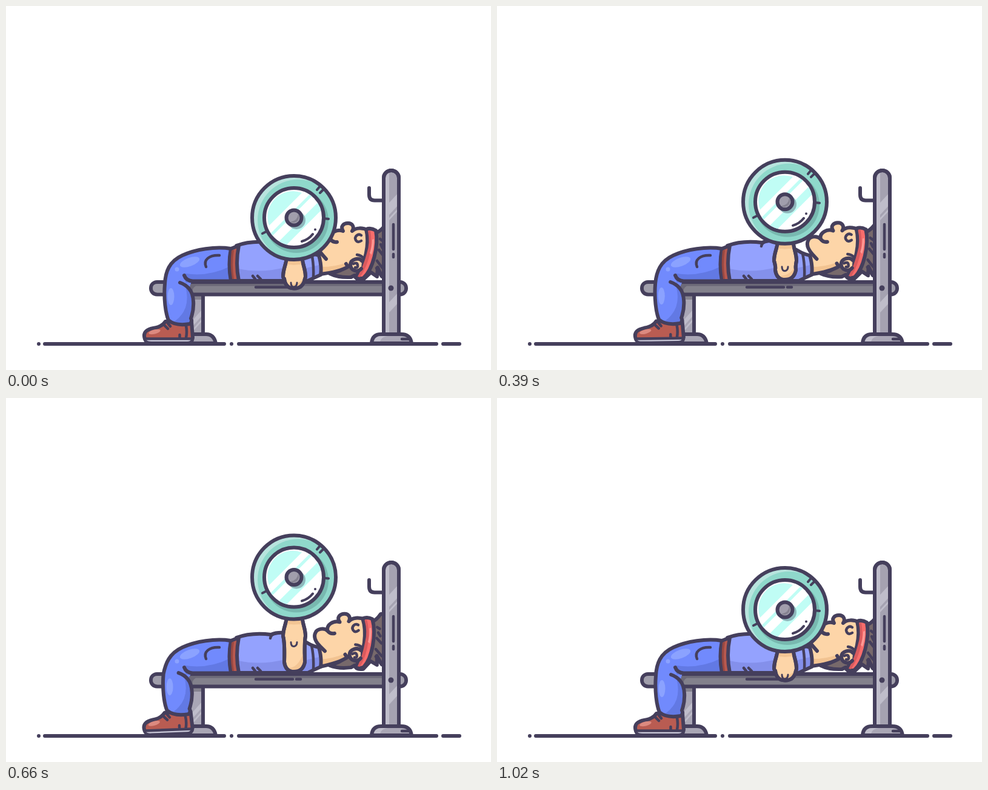
An HTML page for the animation above (1.26 s loop, 800 px wide and 600 px high).

```html
<!DOCTYPE html>
<html lang="en">
<head>
<meta charset="utf-8">
<title>Bench press</title>
<style>
  html, body { margin: 0; width: 100%; height: 100%; overflow: hidden; background: #fff; }
  svg { display: block; width: 800px; height: 600px; }
  .o { stroke: #453f5c; stroke-width: 6; stroke-linecap: round; stroke-linejoin: round; }
  .l { fill: none; stroke: #453f5c; stroke-width: 4.5; stroke-linecap: round; stroke-linejoin: round; }
  .n { fill: none; }
</style>
</head>
<body>
<svg viewBox="0 0 800 600">
  <defs>
    <clipPath id="postClip"><path d="M623 541V283.500a12.500 12.500 0 0 1 25 0V541z"/></clipPath>
    <clipPath id="glassClip"><circle r="46"/></clipPath>
    <clipPath id="rimClip"><circle r="69"/></clipPath>
    <clipPath id="legClip"><path id="legShape"/></clipPath>
    <clipPath id="armClip"><path id="armShape"/></clipPath>
  </defs>

  <!-- floor -->
  <path class="o n" d="M54 557h0M64 557H360M372 557h0M384 557H710M721 557H748"/>

  <!-- bench -->
  <g>
    <path class="o" fill="#a9a6b5" d="M303 472H325V543H303z"/>
    <path fill="#bfbdca" d="M306 520L322 502V512L306 530zM306 535L322 517V521L306 539z"/>
    <path fill="#85828f" d="M306 478H322V484H306z"/>
    <path class="o" fill="#a9a6b5" d="M290 541H330Q343 541 346 556H290z"/>
    <rect class="o" x="239" y="455" width="421" height="20.500" rx="10" fill="#83818c"/>
    <path fill="#a09eab" d="M250 458Q242 458 242 465T250 472.500H262V458zM650 458H650Q657 459 657 465T650 472.500z"/>
    <path fill="#6c6978" d="M300 458H622V461.500H313Q306 466 308 472H302z"/>
    <path class="l" stroke-width="4" d="M412 463.500H473M479 463.500H486"/>
  </g>

  <!-- head -->
  <g id="head">
    <path class="o" fill="#77696b" d="M608 375Q617 372 624 363L636 362V446L620 446L613 431L612 446L602 439L589 451Q577 452 575 444L569 447Q548 448 534 441Q552 438 562 429L590 400z"/>
    <path class="l" stroke-width="4" d="M621 387L617 384M622 411L615 402M621 432L612 420M618 444L611 432M621 399L618 393"/>
    <path fill="#fdd5a8" d="M510 411L521 408C516 402 512 393 514 387C517 379 529 378 535 384C534 374 545 367 556 371C551 363 557 358 564 358C572 358 575 365 571 371C577 365 590 365 598 370C601 392 594 420 585 433L564 431Q548 438 518 443z"/>
    <path fill="#f2c391" d="M515 430Q540 431 562 423L564 431Q546 438 518 443z"/>
    <path class="o n" d="M528 417L521 409C515 402 511 394 514 387C517 379 529 378 535 384C533 374 546 367 556 371C551 363 557 358 564 358C572 358 575 365 571 371C577 365 588 365 598 370"/>
    <path class="o n" stroke-width="5" d="M535 384Q539 390 546 389"/>
    <path class="o n" d="M519 442Q550 438 564 430L561 425"/>
    <path class="l" d="M586 378C580 374 574 381 577 386Q580 391 586 387"/>
    <path class="o" fill="#f96d6c" d="M594 368Q602 365 610 370C615 396 605 434 590 448Q582 451 577 446C593 426 600 391 594 368z"/>
    <path fill="#d95b5e" d="M597 371Q601 390 595 408Q589 430 580 446L584 447Q596 430 601 405Q604 388 601 370z"/>
    <path fill="#ff9a96" d="M604 385L607 384Q607 398 603 410L600 407Q604 396 604 385z"/>
    <path class="l" stroke-width="5" d="M579 410Q586 411 590 416"/>
    <path class="o" stroke-width="5" fill="#fdd5a8" d="M587 420C582 414 569 417 568 426C568 436 580 440 586 433"/>
    <path class="l" stroke-width="4" d="M573 425Q579 422 580 427T576 431"/>
  </g>

  <!-- torso -->
  <g>
    <path class="o" fill="#94a2fe" d="M380 395Q405 386 437 390Q446 386 460 387L494 402Q505 409 516 411Q521 428 519 443L497 453H380z"/>
    <path fill="#8490eb" d="M383 433Q420 441 460 431L495 432L516 427L516 441L497 450H383z"/>
    <path class="l" stroke-width="5" d="M436 396Q437 389 446 388M504 408Q508 426 507 446M407 445L411 450M415 445L420 450"/>
  </g>

  <!-- shoe -->
  <g id="shoe">
    <path class="o" fill="#b95c52" d="M229 549C225 537 233 533 243 531Q257 529 263 520H306L308 547Q307 555 300 555H240Q231 555 229 549z"/>
    <path fill="#cbcada" d="M231 550H305Q304 553 299 553H240Q233 553 231 550z"/>
    <ellipse cx="245" cy="537" rx="10" ry="3.500" fill="#dc8a80" transform="rotate(-14 245 537)"/>
    <path class="l" stroke-width="4" d="M230 548.500H306M297 527Q299 537 297 547M286.500 542V546M262 527L267 532M267 523L271 528"/>
  </g>

  <!-- trousers -->
  <g>
    <path id="legFill" fill="#718afd"/>
    <g clip-path="url(#legClip)">
      <path fill="#6279e4" d="M296 441Q335 447 372 428V456H296z"/>
      <path id="calfShade" fill="#6279e4" d="M296 462Q306 500 278 520L290 530H315V462z"/>
      <ellipse cx="303" cy="422" rx="17" ry="7" fill="#8ba2ff" transform="rotate(-20 303 422)"/>
      <circle cx="282" cy="434" r="3.500" fill="#8ba2ff"/>
      <ellipse id="calfShine" cx="272" cy="479" rx="5.500" ry="14" fill="#8ba2ff"/>
    </g>
    <path id="legLine" class="o n"/>
    <path class="l" d="M330 430C325 418 336 410 352 411"/>
    <path class="o" fill="#b8594f" d="M371 400Q366 426 371 453H384Q378 424 384 395z"/>
    <path fill="#984842" d="M372 403Q369 427 373 450H376Q372 426 376 402z"/>
  </g>

  <!-- arm -->
  <g>
    <path id="arm" class="o" fill="#fdd5a8"/>
    <g clip-path="url(#armClip)"><path id="armShade" fill="#f3c594"/></g>
    <path id="armLine" class="o n"/>
    <path id="crease" class="l" style="stroke-width:3"/>
  </g>

  <!-- weight -->
  <g id="plate">
    <circle r="69" fill="#b8e4de"/>
    <g clip-path="url(#rimClip)">
      <circle cx="7" cy="4" r="67" fill="#8fd8cb"/>
      <circle cx="4" cy="5" r="53" fill="#78b9b0"/>
    </g>
    <circle class="o n" r="69"/>
    <circle class="o" r="49" fill="#fff"/>
    <g clip-path="url(#glassClip)" fill="#c0fdf5">
      <path d="M-41 13A42 42 0 0 1 13 -41z"/>
      <g transform="rotate(-45)">
        <rect x="-50" y="-9" width="100" height="5"/>
        <rect x="-50" y="10" width="100" height="13"/>
      </g>
    </g>
    <circle cx="4" cy="4" r="15" fill="#8eb7bb"/>
    <circle class="o" r="12.500" fill="#a19eac"/>
    <path fill="#858290" d="M7 -6A9.500 9.500 0 0 1 -6 7Q6 5 7 -6z"/>
    <path class="l" style="stroke-width:4" d="M38 -46L43 -52M43 -41L49 -47M52 1.500L57 2M-52 26L-46 23M13 39Q24 36 31 27M35 19.500h0"/>
  </g>

  <!-- rack -->
  <g>
    <path class="o n" d="M599 300V311Q599 320.500 608 320.500H622"/>
    <path class="o" fill="#a5a2b1" d="M623 541V283.500a12.500 12.500 0 0 1 25 0V541z"/>
    <g clip-path="url(#postClip)" fill="#bfbdca">
      <path d="M626 541V284Q627 276 632 275V541z"/>
      <path d="M623 334L648 307V327L623 354zM623 359L648 332V336L623 363zM623 498L648 471V488L623 515z"/>
    </g>
    <path class="o n" d="M623 541V283.500a12.500 12.500 0 0 1 25 0V541z"/>
    <path class="l" stroke-width="4" d="M639 360V401M639 409V414"/>
    <circle cx="635" cy="465" r="4.500" fill="#453f5c"/>
    <path class="o" fill="#a9a6b5" d="M603 556Q604 541 619 541H652Q667 541 669 556z"/>
    <path fill="#c1bfcc" d="M607 553Q609 544 619 544H630Q619 545 617 553z"/>
    <path class="l" stroke-width="4" d="M653 549H665"/>
  </g>
</svg>
<script>
  const LOOP = 1260, STEP = 30, LAST = 1020;
  const $ = id => document.getElementById(id);
  const set = (id, d) => $(id).setAttribute('d', d);
  const move = (id, t) => $(id).setAttribute('transform', t);

  // [time, value] pairs
  const barKeys = [[0, 349], [90, 355.5], [180, 353], [300, 337], [450, 313], [540, 298],
                   [600, 288.5], [660, 295.5], [780, 314], [1020, 349]];
  const headKeys = [[0, 0], [180, 0], [300, -.6], [450, -1.7], [540, -3.3], [600, -4.8],
                    [660, -4.2], [780, -1.7], [1020, 0]];
  const footKeys = [[0, 0], [330, 0], [450, .75], [600, 1.1], [660, .95], [770, 0], [1020, 0]];

  // smooth curve through the keys
  function at(keys, t) {
    let i = 0;
    while (i < keys.length - 2 && t > keys[i + 1][0]) i++;
    const slope = k => {
      const a = keys[Math.max(k - 1, 0)], b = keys[Math.min(k + 1, keys.length - 1)];
      return (b[1] - a[1]) / (b[0] - a[0]);
    };
    const [t0, v0] = keys[i], [t1, v1] = keys[i + 1];
    const d = t1 - t0, u = (t - t0) / d, w = 1 - u;
    return w * w * (1 + 2 * u) * v0 + u * u * (3 - 2 * u) * v1
         + d * u * w * (w * slope(i) - u * slope(i + 1));
  }

  function drawArm(y) {
    const e = y + 112, b = Math.max(451, e + 4.5);
    const d = `M464 ${y + 60}C463 ${e - 36} 457 ${e - 29} 457 ${e - 15}`
            + `Q460 ${e - 5} 459 ${b - 16}Q461 ${b} 475 ${b}Q490 ${b} 493 ${b - 16}`
            + `Q492 ${e - 5} 494 ${e - 15}C494 ${e - 29} 488 ${e - 36} 488 ${y + 60}`;
    for (const id of ['arm', 'armShape', 'armLine']) set(id, d);
    set('armShade', `M455 ${y + 66}H495V${y + 74}Q475 ${y + 82} 455 ${y + 74}z`
      + `M498 ${e - 20}Q490 ${b - 8} 468 ${b - 6}V${b}H498z`);
    set('crease', `M470 ${e - 5}Q470 ${e + 2} 475 ${e + 2}Q480 ${e + 1} 480 ${e - 5}`);
  }

  function drawLeg(lift) {
    const p = (x, y) => `${x - 2.5 * lift} ${y - 3 * lift} `;
    const outer = `M371 400C345 396 313 401 291 411C269 421 263 438 ${p(262, 458)}`
                + `C${p(260, 482)}${p(263, 506)}${p(268, 518)}Q${p(280, 528)}${p(303, 524)}`
                + `Q${p(308, 521)}${p(305, 515)}`;
    const inner = `C${p(311, 498)}${p(311, 476)}${p(302, 466)}Q${p(296, 459)}${p(287, 456)}`;
    const fill = `${outer}C${p(311, 498)}${p(311, 476)}${p(302, 466)}L306 454H371z`;
    set('legFill', fill);
    set('legShape', fill);
    set('legLine', `${outer}${inner}M371 453.5H308Q297 453 294 444`);
    const shift = `translate(${-2 * lift} ${-3 * lift})`;
    move('calfShade', shift);
    move('calfShine', shift);
    move('shoe', `rotate(${-2.4 * lift} 230 555)`);
  }

  function frame(now) {
    const t = Math.min(Math.floor((now % LOOP) / STEP) * STEP, LAST);
    const y = at(barKeys, t);
    move('plate', `translate(475 ${y})`);
    move('head', `rotate(${at(headKeys, t)} 530 445)`);
    drawArm(y);
    drawLeg(at(footKeys, t));
  }

  const start = performance.now();
  function tick() {
    frame(performance.now() - start);
    requestAnimationFrame(tick);
  }
  tick();
</script>
</body>
</html>
```
